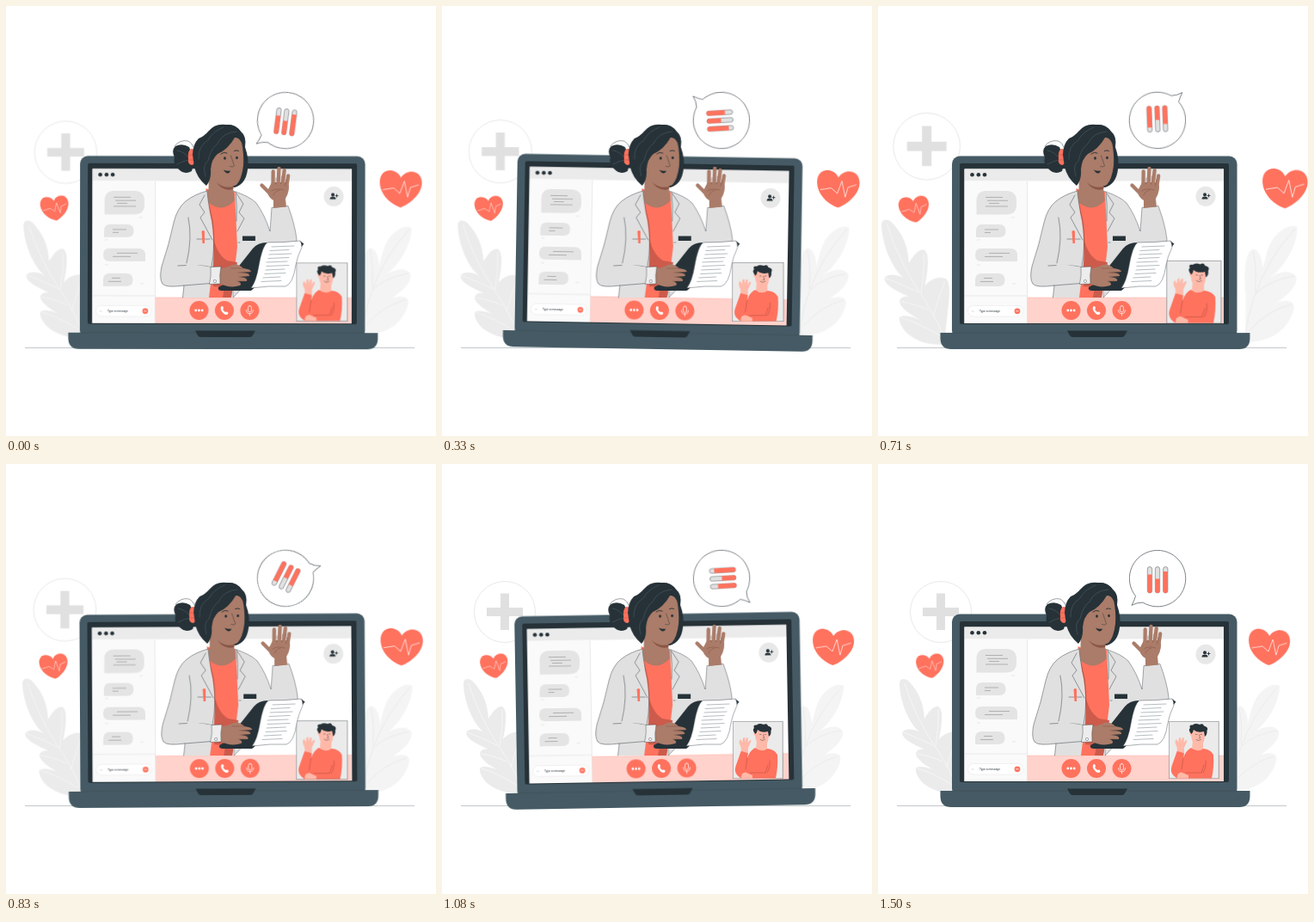
These frames come from a looping animation (500x500 px, 1.54 s). An HTML page:

```html
<!DOCTYPE html>
<html lang="en">
<head>
<meta charset="utf-8">
<title>Online doctor</title>
<style>
html, body { margin: 0; width: 100%; height: 100%; overflow: hidden; background: #fff; }
svg { display: block; width: 100vw; height: 100vh; }
.beat, .tilt, .spin, .shake { animation: 1540ms linear -30ms infinite; }
.beat { animation-name: beat; }
.tilt { animation-name: tilt; transform-origin: 252.5px 287px; }
.spin { animation-name: spin; transform-origin: 325px 133px; }
.shake { animation-name: shake; }
#back { transform-origin: 247px 266px; }
#hearts { transform-origin: 261px 220px; }
#patient { transform-origin: 367px 332.5px; }

/* 1500 ms of motion, then a 40 ms rest */
@keyframes beat {
  0%, 29.22%, 38.96%, 58.44%, 100% { transform: scale(1); }
  9.74%, 48.7% { transform: scale(1.1); }
}
@keyframes tilt {
  0%, 97.4%, 100% { transform: rotate(0deg); }
  24.35% { transform: rotate(1deg); }
  73.05% { transform: rotate(-1deg); }
}
@keyframes spin {
  0% { transform: rotate(0deg); }
  97.4%, 100% { transform: rotate(360deg); }
}
@keyframes shake {
  0%, 97.4%, 100% { transform: translateX(0); }
  9.74%, 87.66% { transform: translateX(-.6px); }
  19.48%, 77.92% { transform: translateX(1.2px); }
  29.22%, 48.7%, 68.18% { transform: translateX(-2.4px); }
  38.96%, 58.44% { transform: translateX(2.4px); }
}

.coral { fill: #ff725e; }
.shade { fill: #cc5b4b; }
.dark { fill: #263238; }
.slate { fill: #455a64; }
.pale { fill: #ebebeb; }
.coat { fill: #e0e0e0; }
.skin { fill: #aa7c69; }
.peach { fill: #ffb9a9; }
.white { fill: #fff; }
.edge { stroke: #263238; stroke-width: .4; stroke-linejoin: round; }
.line, .glyph, .vein, .finger { fill: none; stroke-linecap: round; stroke-linejoin: round; }
.line { stroke: #263238; stroke-width: .45; }
.glyph { stroke: #fff; stroke-width: .7; }
.vein { stroke: #fff; stroke-width: .5; }
.finger { stroke: #aa7c69; stroke-width: 4.3; }
.bold { stroke-width: .9; }
.seam { stroke: #7c4c3e; }
.fold { stroke: #a6483a; }
.shine { stroke: #5a6c75; }
</style>
</head>
<body>
<svg viewBox="0 0 500 500" xmlns="http://www.w3.org/2000/svg">
  <defs>
    <path id="heart" d="M0 21C-12 17-24 6-24-8C-24-17-18-22-11-21C-5-20-2-17 0-13C3-18 8-20 12-20C19-20 24-15 24-7C24 6 9 18 0 21Z"/>
    <path id="pulse" d="M-20 1L-8-1L-1 5L4-9L8 9L11-2L20-5"/>
    <rect id="tube" x="-2.700" y="119.500" width="5.400" height="30.500" rx="2.700" class="coat edge"/>
  </defs>

  <g id="back" class="beat">
    <g fill="#ebebeb">
      <path d="M25 255C25 249 32 248 37 254C46 264 53 276 54 296C59 288 64 281 70 282C76 285 75 302 71 320C77 313 86 309 94 313C101 321 94 350 92 382C80 384 66 381 55 373C48 368 43 359 44 354C47 350 60 353 67 357C56 351 45 344 44 337C45 330 56 330 62 336C48 328 28 322 28 312C32 306 45 309 50 313C36 303 25 275 25 255Z"/>
      <path fill="#f4f4f4" d="M467 258C460 254 448 260 440 272C435 280 433 291 430 302C430 290 425 281 420 281C411 283 410 307 412 330V380C433 380 455 372 463 346C465 337 459 334 445 338C455 331 467 322 466 311C462 303 448 304 437 312C452 302 467 278 467 258Z"/>
    </g>
    <path class="vein" d="M31 255Q42 292 66 328T92 381M70 286Q71 307 67 328M29 312Q48 319 64 327M46 337Q63 340 75 346M46 354Q68 361 88 374M92 316Q86 332 80 352"/>
    <path class="vein" style="stroke:#e2e2e2" d="M464 260Q435 292 422 330T413 379M463 310Q438 314 423 328M460 340Q434 347 416 368M420 284Q424 302 422 326"/>
    <circle cx="73" cy="172" r="35.500" class="white" stroke="#e3e3e3" stroke-width=".8"/>
    <path class="coat" d="M68 150.500H78V167H94V177H78V193H68V177H52V167H68Z"/>
  </g>

  <g id="hearts" class="beat">
    <g transform="translate(61 235) rotate(-8) scale(.67)">
      <use href="#heart" class="coral"/><use href="#pulse" class="glyph"/>
    </g>
    <g transform="translate(455 213) rotate(1)">
      <use href="#heart" class="coral"/><use href="#pulse" class="glyph"/>
    </g>
  </g>

  <path d="M22 397.500H475" stroke="#b4babd" stroke-width=".8"/>

  <g class="spin">
    <path class="white" stroke="#263238" stroke-width=".6" stroke-linejoin="round" d="M299.500 153.500A32.700 32.700 0 1 1 308 161Q301 161 295 164.300Q298 159 299.500 153.500Z"/>
    <g transform="translate(316 0)"><use href="#tube"/><path class="coral" d="M-2.700 128.500H2.700V147.300A2.700 2.700 0 0 1-2.700 147.300Z"/></g>
    <g transform="translate(325 0)"><use href="#tube"/><path class="coral" d="M-2.700 133.500H2.700V147.300A2.700 2.700 0 0 1-2.700 147.300Z"/></g>
    <g transform="translate(334.300 0)"><use href="#tube"/><path class="coral" d="M-2.700 125H2.700V147.300A2.700 2.700 0 0 1-2.700 147.300Z"/></g>
  </g>

  <g class="tilt">
    <rect x="86" y="174.500" width="331.500" height="212" rx="9" class="slate"/>
    <rect x="95" y="183" width="313" height="187" rx="2" class="dark"/>
    <rect x="100.500" y="189.500" width="301.500" height="179.500" class="white"/>
    <rect x="100.500" y="189.500" width="301.500" height="14" class="pale"/>
    <g class="dark">
      <circle cx="109.500" cy="196.300" r="2.300"/><circle cx="116.800" cy="196.300" r="2.300"/><circle cx="124" cy="196.300" r="2.300"/>
    </g>
    <rect x="100.500" y="203.500" width="73" height="165.500" fill="#fafafa"/>
    <path d="M173.500 204V369M101 337H173" fill="none" stroke="#dcdcdc" stroke-width=".6"/>
    <rect x="173.500" y="339" width="228.500" height="30" fill="#ffd2cc"/>
    <path d="M173.500 339H402" stroke="#ff9c8e" stroke-width=".4"/>

    <g fill="#e4e4e4">
      <path d="M126 215H149Q161 215 161 227V231Q161 242.500 149 242.500H114.500V227Q114.500 215 126 215Z"/>
      <path d="M121 254H141Q148.500 254 148.500 261.500T141 269H114V261.500Q114 254 121 254Z"/>
      <path d="M120 282H154Q162 282 162 290V297H120Q113 297 113 289.500T120 282Z"/>
      <path d="M120.500 311H140Q147.500 311 147.500 318.500T140 326H113V318.500Q113 311 120.500 311Z"/>
    </g>
    <path d="M125 222.500H145M127 226.300H151M129 229.500H141M125 233H151M124 260H140M124 263.500H131M129 287.500H153M124 291.500H145M123 316.500H133M119 320.500H134" fill="none" stroke="#9a9a9a" stroke-width=".7"/>
    <path d="M155 246H159M115 272H119M115 301H119M156 323H160" fill="none" stroke="#d8d8d8" stroke-width=".6"/>

    <rect x="104.500" y="348.500" width="65" height="12.500" rx="6.200" class="white" stroke="#e2e2e2" stroke-width=".5"/>
    <path d="M108.500 355H112" stroke="#c8c8c8" stroke-width=".6"/>
    <text x="118" y="356.300" font-family="Roboto, sans-serif" font-size="3.300" fill="#263238">Type a message</text>
    <circle cx="162" cy="354.800" r="3.400" class="coral"/>
    <path class="glyph" d="M160.500 354.800H163.300"/>

    <circle cx="381" cy="221.300" r="11.500" fill="#e8e8e8"/>
    <circle cx="380" cy="219.200" r="2" class="dark"/>
    <path class="dark" d="M376.500 224.500Q376.500 221.500 380 221.500T383.500 224.500Z"/>
    <path class="line bold" d="M383 220.500H386M384.500 219V222"/>

    <g class="coral"><circle cx="224.500" cy="354" r="11"/><circle cx="254" cy="354" r="11"/><circle cx="283.500" cy="354" r="11"/></g>
    <g class="white"><circle cx="220.800" cy="354" r="1.400"/><circle cx="224.500" cy="354" r="1.400"/><circle cx="228.200" cy="354" r="1.400"/></g>
    <path class="white" d="M250.500 349.300Q252 348.600 252.800 350.500Q253.400 352 252.200 352.800Q253 354.800 255.200 356Q256.300 354.900 257.600 355.800Q259.200 357 258 358.300Q256.300 360 253.300 357.700Q248 353 250.500 349.300Z"/>
    <path class="glyph" d="M283.500 348.500Q285.500 348.500 285.500 350.500V354Q285.500 356 283.500 356T281.500 354V350.500Q281.500 348.500 283.500 348.500ZM279.500 353.500Q279.700 357.800 283.500 357.800T287.500 353.500M283.500 357.800V360"/>

    <path class="slate" d="M72.500 380H432.500V386Q432.500 399 420 399H85Q72.500 399 72.500 386Z"/>
    <path d="M86 380H418" stroke="#384a53" stroke-width=".4"/>
    <path class="dark" d="M220 377.500H290L287 383Q286 385 283.500 385H226.500Q224 385 223 383Z"/>
  </g>

  <g id="patient" class="beat">
    <rect x="338.300" y="299.300" width="58" height="66.500" class="pale edge"/>
    <path class="peach" d="M366 321H378V333Q371 338 365 332Z"/>
    <path class="coral" d="M364 330Q371 336 378.500 331Q387 332 390 338Q391 352 388 365.500H348Q338 360 342 350L348 333L356 336L355 342Q358 333 364 330Z"/>
    <path class="peach" d="M348 334L347.500 329Q344 323 347 320L349.500 324Q349 317 352 318L352.500 323Q354 316 356 319L355.500 324Q359 319 359.500 322L356 330L356 336Z"/>
    <path class="peach" d="M364 310Q367 306 372 306Q380 306 380 314Q380 327 373.500 327Q365 327 364 316Q361 314 364 310Z"/>
    <path class="dark" d="M364.500 314Q360 309 363 307Q361 303 366 303.500Q369 301 374 303Q378 301 379 304.500Q385 306 382.500 310Q383 315 380 317L379 311Q371 313 367 309Q366 313 364.500 314Z"/>
    <path class="line" d="M369.500 314.500H371M375 314.500H376.500M373.500 315L374.700 318.500L373 319M370 320.500Q372.500 323 375.500 320.500"/>
    <path class="peach" d="M348 365.500Q347 359 353 358.500L361 362V365.500Z"/>
    <path class="line fold" d="M355 342L353 355M358 359H376L379 350M378 359Q382 353 381 345"/>
  </g>

  <g class="shake">
    <!-- raised arm and far sleeve -->
    <path class="coat edge" d="M264 215Q283 221 291 229Q301 243 307 262L309 234.500L328 232.500Q336 254 338 271Q338 286 329 294L290 312L264 339Z"/>
    <path class="skin" d="M311 235L311 226Q304 222 304 215L309 205H328Q331 214 325 224L326 233.500Z"/>
    <path class="finger" d="M306 217L297.500 208.500M310.500 211L310.700 192.500M316.500 209L317.500 189M321.500 210L323.700 191M326 212L328.200 197.500"/>
    <path class="line seam" d="M313.700 207L314 200M319.600 207L320.500 198M324.500 209L326 202M309 215Q315 211 323 214M311 220Q313 215 318 214"/>

    <!-- hair behind, shirt, neck -->
    <path class="dark" d="M240 160L256 138Q267 137 273 146Q280 151 278 164Q283 178 281 190Q279 207 266 211L244 204Z"/>
    <path class="coral" d="M232.500 212Q250 221 266 216L269 280L262 339H236Z"/>
    <path class="shade" d="M240 264Q244 288 257 296L269 298L262 339H252L254 327L241 326Z"/>
    <path class="skin" d="M236 190L235.500 213Q232 221 233 226Q250 243 266 226L263 204Z"/>
    <path fill="#8a5546" d="M245 205Q253 213 265 210L264 213Q252 216 245 205Z"/>

    <!-- coat -->
    <path class="coat" d="M234 215Q219 219 209 227Q199 235 195 252Q190 276 181 303Q178 317 182 323Q186 328 207 325L205.500 339H236L241 300Q243 265 237 240Z"/>
    <path class="line" d="M234 215Q219 219 209 227Q199 235 195 252Q190 276 181 303Q178 317 182 323Q186 328 207 325L205.500 339M234 216Q235 230 240 250Q244 278 239 303M231 220L225 231L231 240L226 246L240 272M212 246Q217 270 210 299M222 271L237 271M200 302Q225 300 240 304M267 216Q269 232 268 250M268 218L276 230L271 240L277 247L269 262M270 275H272"/>
    <path class="coat" d="M207 325L238 322L240 304L210 299Z"/>
    <path class="line" d="M207 325L238 322.500"/>
    <path class="coral" d="M227.500 262Q229.500 260 231 262L231 276H228.500Z"/>
    <path class="dark" d="M275 267.500H290V273H275Z"/>

    <!-- folder, paper, holding hand -->
    <path class="dark" d="M303 275Q293 275 287 282L268 306Q262 321 247 327Q246 331 251 331H285Q290 328 292 319L305 278Z"/>
    <path class="white edge" d="M304 275Q325 275 342 273Q347 275 343 283Q339 291 337 301Q334 323 325 326Q306 325 285 328Q291 320 294 302Q298 279 304 275Z"/>
    <path class="dark" d="M341 273L346.500 276.500L343.500 280Q344 275 341 273Z"/>
    <path class="line shine" d="M309 280L335 279M307 284.500L329 283.500M306 289L332 288M305 293.500L329 292.500M303 298L327 297M303 302.500L329 301.500M302 307L324 306M301 311.500L325 310.500M299 316L319 315M297 320.500L320 319.500"/>
    <path class="skin" d="M247 305Q256 305 263 301Q270 299 276 305Q285 306 285 309L271 310Q284 310 283 314L272 315Q282 316 280 320L270 320Q275 323 272 325Q260 329 247 322Z"/>
    <path class="line seam" d="M270 310L283 310M271 315H281M269 320H278M262 305L276 305"/>
    <path fill="#ededed" class="edge" d="M238 303.500L250 303Q248 313 249 323L236.500 323.500Q239 313 238 303.500Z"/>
    <circle cx="243" cy="320" r="1.600" class="white edge"/>

    <!-- bun and head -->
    <path class="line" d="M196 163Q202 155 212 157Q216 159 218 164"/>
    <path class="dark" d="M213 164Q205 159 197 163Q192 168 196 176Q194 184 200 189Q207 197 216 192Q221 180 213 164Z"/>
    <path class="line shine" d="M199 168Q207 169 213 177M199 184Q206 180 213 179"/>
    <path class="coral" d="M215 166Q220 165 220 173Q221 182 217 185Q211 185 212 177Q211 169 215 166Z"/>
    <path class="line fold" d="M213 173H219M213 179H219"/>
    <path class="skin" d="M238 178Q254 166 264 152Q271 152 274 158Q277 172 276 186Q274 202 268 208Q261 212 252 208Q242 204 238 195Z"/>
    <path class="dark" d="M217 173Q217 161 224 154Q231 151 235 146Q243 136 256 138Q267 137 273 146Q278 150 278 162L274 159Q271 152 266 153Q258 167 246 172Q239 178 238 190Q239 202 233 209Q222 200 219 187Z"/>
    <path class="line shine" d="M268 146Q252 147 246 160Q238 166 235 180Q228 185 232 198M253 141Q240 146 235 156Q223 163 224 178"/>
    <path class="line bold" d="M250 172Q253 169 257 171M265.500 168.500Q268 167 270.500 168.500"/>
    <ellipse cx="254.500" cy="177" rx="1.400" ry="1.800" class="dark"/>
    <ellipse cx="268.500" cy="176.500" rx="1.300" ry="1.800" class="dark"/>
    <path class="line" d="M261.500 174Q264 181 265.500 186Q263.500 188 260.500 186.500"/>
    <path class="dark" d="M253 190.500Q257 192.500 261 191.500Q260 195 257 194.500Q254.500 193.500 253 190.500Z"/>
  </g>
</svg>
</body>
</html>
```
